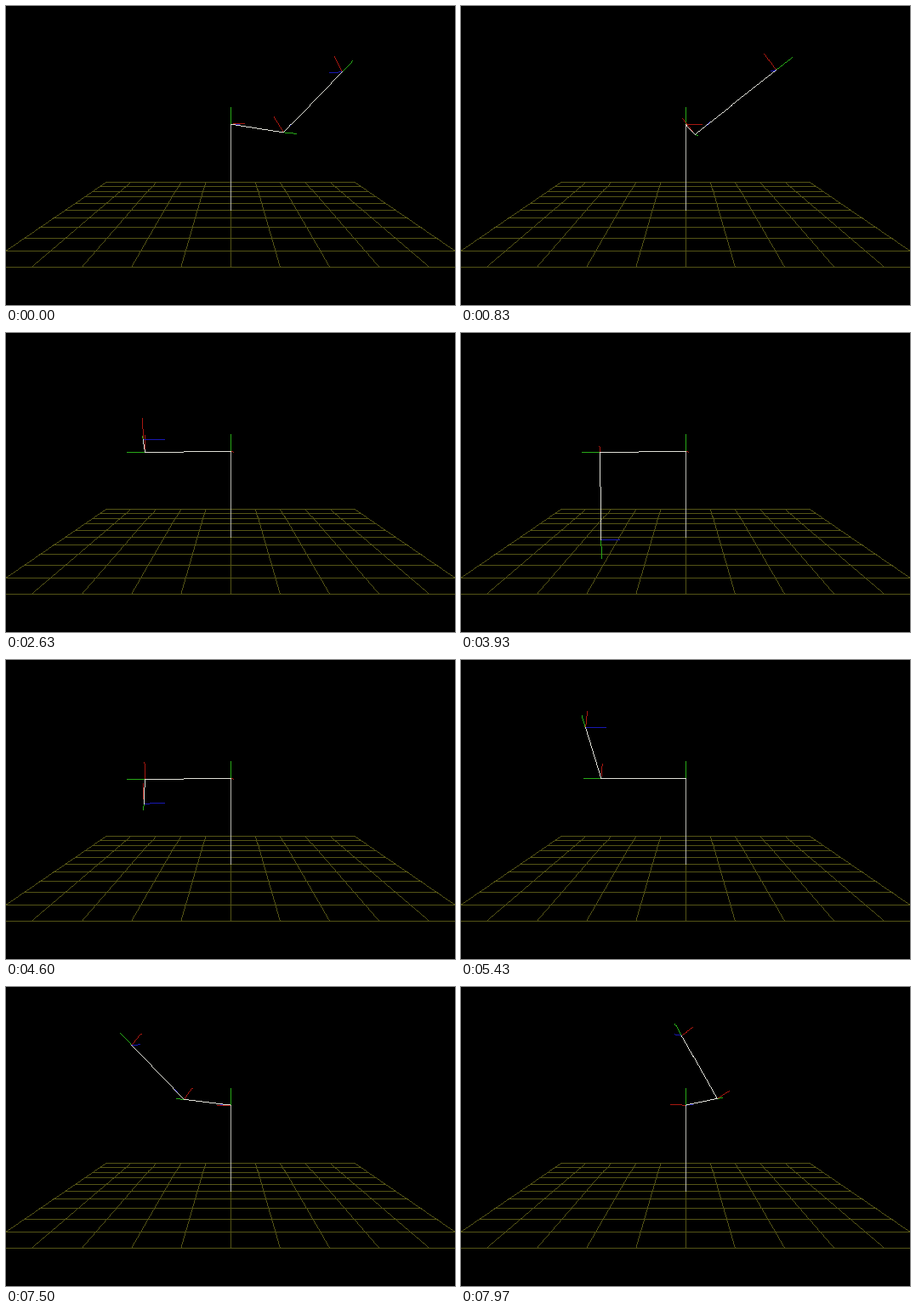
Recreate the animation shown at these times as an HTML page with a canvas. Size 528 by 352 pixels, loop 8 s.

```html
<!DOCTYPE html>
<html>
<head>
<meta charset="utf-8">
<style>
  html, body { margin: 0; width: 100%; height: 100%; overflow: hidden; background: #000; }
  canvas { display: block; }
</style>
</head>
<body>
<canvas id="stage" width="528" height="352"></canvas>
<script>
const ctx = document.getElementById('stage').getContext('2d');
const LOOP = 8000, RAD = Math.PI / 180;
const CAMERA = { y: 3.407, z: 14.595, focal: 579, sin: 0.1184, cos: 0.993 };
const CENTER = { x: 264.1, y: 176.1 };
const POLE = 2.605, UPPER = 2.5, FORE = 2.55, AXIS = 0.5, SAG = 0.045;
const RED = '#a81810', GREEN = '#28a818', BLUE = '#1818b4';
const GRID = '#545416', POST = '#b8b8b0', LINK = '#e0e0d8';

// Each move swings the base (turn) or rolls the forearm, in degrees; the arm rests in between
const REST = { turn: 57.5, roll: 52 };
const MOVES = [
  { start: 370, end: 1700, turn: 171 },
  { start: 2130, end: 3470, roll: 157 },
  { start: 3930, end: 4930, roll: 59 },
  { start: 5270, end: 5900, turn: 227, roll: 49 },
  { start: 7430, end: 7970, turn: 295.6, roll: 32 }
];

const speedUp = t => t ** 1.35;
const clamp = t => Math.min(1, Math.max(0, t));

function poseAt(time) {
  let { turn, roll } = REST;
  for (const move of MOVES) {
    const part = speedUp(clamp((time - move.start) / (move.end - move.start)));
    turn += ((move.turn ?? turn) - turn) * part;
    roll += ((move.roll ?? roll) - roll) * part;
  }
  return [turn * RAD, roll * RAD];
}

const along = (point, dir, length) => point.map((v, i) => v + dir[i] * length);

function project([x, y, z]) {
  const up = y - CAMERA.y, ahead = CAMERA.z - z;
  const scale = CAMERA.focal / (ahead * CAMERA.cos - up * CAMERA.sin);
  return [CENTER.x + x * scale, CENTER.y - (up * CAMERA.cos + ahead * CAMERA.sin) * scale];
}

// One-pixel line without antialiasing
function line(a, b, color) {
  const [x0, y0] = project(a), [x1, y1] = project(b);
  const steps = Math.ceil(Math.max(Math.abs(x1 - x0), Math.abs(y1 - y0), 1));
  ctx.fillStyle = color;
  for (let i = 0; i <= steps; i++) {
    const t = i / steps;
    ctx.fillRect(Math.floor(x0 + (x1 - x0) * t), Math.floor(y0 + (y1 - y0) * t), 1, 1);
  }
}

function axes(origin, red, green, blue) {
  line(origin, along(origin, blue, AXIS), BLUE);
  line(origin, along(origin, red, AXIS), RED);
  line(origin, along(origin, green, AXIS), GREEN);
}

function drawGrid() {
  for (let i = -5; i <= 5; i++) {
    line([-5, 0, i], [5, 0, i], GRID);
    line([i, 0, -5], [i, 0, 5], GRID);
  }
}

function drawArm(turn, roll) {
  const up = [0, 1, 0];
  const arm = [Math.cos(turn), 0, Math.sin(turn)];
  const side = [Math.sin(turn), 0, -Math.cos(turn)];
  const mix = (u, s) => along(side.map(v => v * s), up, u);
  const fore = mix(Math.cos(roll), Math.sin(roll));
  const normal = mix(Math.sin(roll), -Math.cos(roll));
  const shoulder = [0, POLE, 0];
  const elbow = along(along(shoulder, arm, UPPER), up, -SAG * UPPER * Math.sin(turn));
  const tip = along(elbow, fore, FORE);

  axes(shoulder, side, up, arm);
  axes(elbow, normal, arm, fore);
  axes(tip, normal, fore, arm.map(v => -v));
  line([0, 0, 0], shoulder, POST);
  line(shoulder, elbow, LINK);
  line(elbow, tip, LINK);
}

function draw() {
  ctx.fillStyle = '#000';
  ctx.fillRect(0, 0, 528, 352);
  drawGrid();
  drawArm(...poseAt((performance.now() - start) % LOOP));
  requestAnimationFrame(draw);
}

const start = performance.now();
draw();
</script>
</body>
</html>
```
